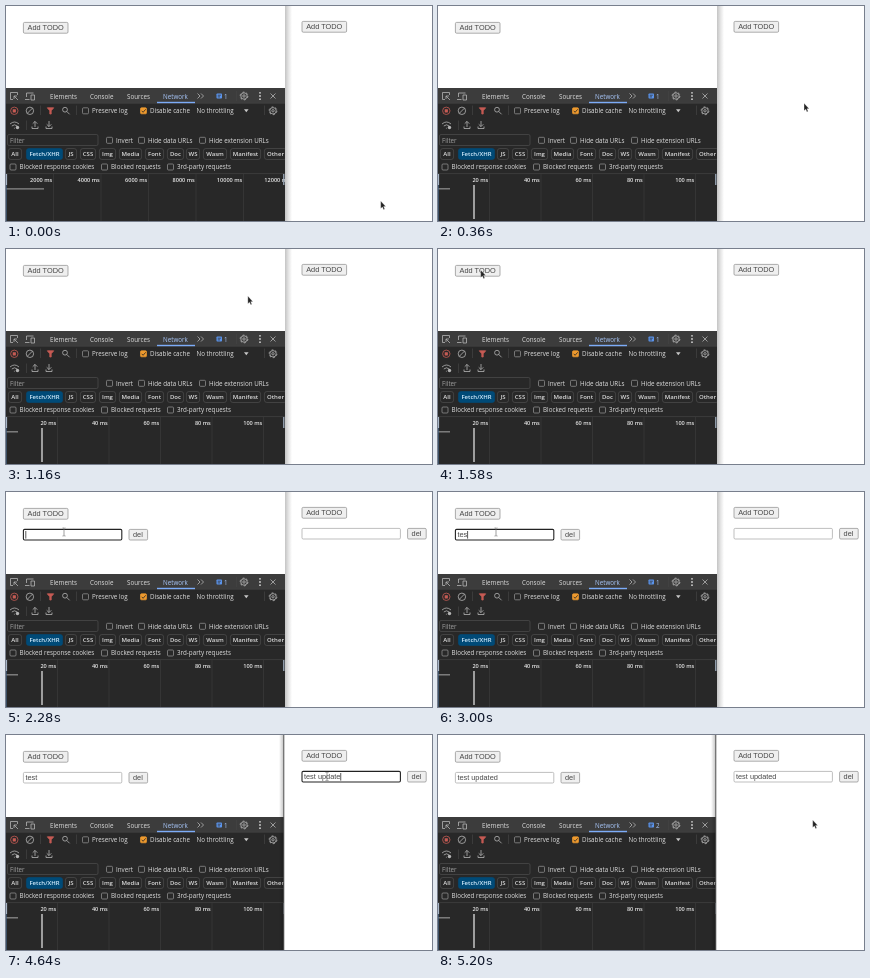
These frames come from a looping animation (426x215 px, 5.22 s). An HTML page:

```html
<!DOCTYPE html>
<html lang="en">
<head>
<meta charset="utf-8">
<title>Synced TODO list</title>
<style>
html, body { margin: 0; width: 100%; height: 100%; overflow: hidden; background: #fff; }
svg { display: block; width: 426px; height: 215px; }
text { white-space: pre; }
.page text { font: 7.35px "Liberation Sans", Arial, sans-serif; fill: #484848; }
.tools text { font: 6.25px "Open Sans", "Noto Sans", sans-serif; fill: #dedede; }
.tools text.strong { font-weight: 600; font-size: 6px; }
.tools .scale text { font-size: 5.6px; font-weight: 600; fill: #e8e8e8; }
.button { fill: #efefef; stroke: #8c8c8c; stroke-width: .7; }
.field { fill: #fff; stroke: #a4a4a4; stroke-width: .7; }
.field.focus { stroke: #222; stroke-width: 1.1; }
.icon { fill: none; stroke: #b4b4b4; stroke-width: .8; }
.icon.red { stroke: #c65b54; }
.rule { stroke: #444; stroke-width: .7; }
.scale .rule { stroke: #3c3c3c; }
.chip { fill: none; stroke: #545454; stroke-width: .6; }
.chip.on { fill: #004a77; stroke: #004a77; }
.box { fill: #282828; stroke: #9a9a9a; stroke-width: .7; }
.box.on { fill: #ee9a2e; stroke: #ee9a2e; }
</style>
</head>
<body>
<svg viewBox="0 0 426 215">
  <defs>
    <linearGradient id="toRight"><stop stop-color="#c4c4c4"/><stop offset=".5" stop-color="#e4e4e4"/><stop offset="1" stop-color="#fff"/></linearGradient>
    <linearGradient id="toLeft"><stop stop-color="#000" stop-opacity="0"/><stop offset="1" stop-color="#000" stop-opacity=".25"/></linearGradient>
    <clipPath id="leftEdge"><rect width="279" height="215"/></clipPath>
  </defs>
  <rect width="426" height="215" fill="#fff"/>
  <g class="tools" id="tools" clip-path="url(#leftEdge)"></g>
  <g class="page" id="page"></g>
  <rect id="leftActive" x="279" width="7" height="215" fill="url(#toRight)"/>
  <g id="rightActive">
    <rect x="278" width="2" height="215" fill="#fff"/>
    <rect x="273" width="5" height="215" fill="url(#toLeft)"/>
    <path d="M277.8 0V215" stroke="#555"/>
  </g>
  <path id="arrow" d="M-.3 0V7.6L1.4 6.1L2.6 8.7L3.8 8.1L2.6 5.6H4.8Z" fill="#222" stroke="#fff" stroke-width=".3"/>
  <path id="beam" d="M-1.5 -4H-.4L0 -3.6L.4 -4H1.5M0 -3.6V3.6M-1.5 4H-.4L0 3.6L.4 4H1.5" fill="none" stroke="#777" stroke-width=".7"/>
</svg>
<script>
const LOOP = 5220;
const $ = id => document.getElementById(id);

function add(parent, tag, attrs, content = "") {
  const el = document.createElementNS("http://www.w3.org/2000/svg", tag);
  for (const key in attrs) el.setAttribute(key, attrs[key]);
  el.textContent = content;
  return parent.appendChild(el);
}
const label = (parent, x, y, content, attrs) => add(parent, "text", { x, y, ...attrs }, content);
const rect = (parent, cls, x, y, width, height, rx = 1) =>
  add(parent, "rect", { class: cls, x, y, width, height, rx });
const show = (el, on) => el.style.display = on ? "" : "none";

// Developer tools
const tools = $("tools");
const icon = (d, cls = "") => add(tools, "path", { class: "icon " + cls, d });
const rule = d => add(tools, "path", { class: "rule", d });

function gear(x, y) {
  add(tools, "circle", { class: "icon", cx: x, cy: y, r: 3.9, "stroke-dasharray": "2 2.08" });
  add(tools, "circle", { class: "icon", cx: x, cy: y, r: 3.2 });
  add(tools, "circle", { class: "icon", cx: x, cy: y, r: 1.2 });
}
function check(x, y, content, on) {
  rect(tools, on ? "box on" : "box", x + .5, y - 3, 6, 6);
  if (on) icon(`M${x + 1.7} ${y}l1.4 1.5l2.6 -3`).style.stroke = "#222";
  label(tools, x + 10, y + 2.4, content);
}

add(tools, "rect", { y: 82, width: 279, height: 133, fill: "#282828" });
add(tools, "rect", { y: 82, width: 279, height: 15, fill: "#3c3c3c" });
rule("M0 97.3H279M0 167.6H279M34.5 99.5V109M70.5 99.5V109M20.5 114.5V124M230.5 85V95M258.5 99.5V109");

// Tab bar
icon("M7 93.5H4.5V86.5H11.5V89M8 90L12 94M8 93V90H11");
icon("M20.5 91V87H27.5M19 93.5H23.5M25 89H28.5V94H25Z");
[[44, "Elements"], [84, "Console"], [121, "Sources"]].forEach(([x, name]) => label(tools, x, 92.7, name));
label(tools, 157, 92.7, "Network", { style: "fill:#a8c7fa" });
add(tools, "rect", { x: 151, y: 95.8, width: 38, height: 1.4, fill: "#7cacf8" });
icon("M191.5 87.5L194 90L191.5 92.5M195 87.5L197.5 90L195 92.5");
rect(tools, "", 210.5, 87.5, 5.5, 5, .8).setAttribute("fill", "#5b94ec");
icon("M211.7 89.2H214.8M211.7 90.9H214").style.stroke = "#333";
const issues = label(tools, 218, 92.5, "1", { style: "fill:#a8c7fa" });
gear(238, 90);
for (const y of [86.8, 90, 93.2]) add(tools, "circle", { cx: 254, cy: y, r: .9, fill: "#d0d0d0" });
icon("M264.5 87.5L269.5 92.5M269.5 87.5L264.5 92.5");

// Toolbar
add(tools, "circle", { class: "icon red", cx: 8.3, cy: 104.8, r: 3.7 });
rect(tools, "", 6.7, 103.2, 3.2, 3.2, .3).setAttribute("fill", "#c65b54");
icon("M20.2 104.8a3.7 3.7 0 1 0 7.4 0a3.7 3.7 0 1 0 -7.4 0M21.3 107.3L26.4 102.2");
icon("M41.3 101.8H47.7L45.2 104.8V108H43.8V104.8Z", "red").style.fill = "#c65b54";
icon("M56.6 103.7a2.4 2.4 0 1 0 4.8 0a2.4 2.4 0 1 0 -4.8 0M60.8 105.5L63.6 108.3");
check(76, 104.8, "Preserve log");
check(134, 104.8, "Disable cache", true);
label(tools, 190.5, 107.2, "No throttling");
add(tools, "path", { d: "M238 103.3H242.6L240.3 106.3Z", fill: "#c7c7c7" });
gear(267, 104.8);
icon("M4 118q4.5 -4 9 0M5.8 120q2.7 -2.4 5.4 0M8.4 121.8V122.6");
add(tools, "circle", { cx: 11.5, cy: 121.5, r: 1.7, fill: "#b4b4b4" });
icon("M29 121V115.5M26.7 117.7L29 115.4L31.3 117.7M26 120.5V122.5H32V120.5");
icon("M43 115V120.5M40.7 118.3L43 120.6L45.3 118.3M40 120.5V122.5H46V120.5");

// Filters
rect(tools, "chip", 1.5, 128.5, 90.5, 11, 1.5);
label(tools, 4, 136.6, "Filter", { style: "fill:#a0a0a0" });
check(100, 134.3, "Invert");
check(132, 134.3, "Hide data URLs");
check(193, 134.3, "Hide extension URLs");
const chips = [["All", 2, 16], ["Fetch/XHR", 20, 57], ["JS", 59, 71], ["CSS", 74, 90], ["Img", 93, 110],
  ["Media", 113, 136], ["Font", 139, 158], ["Doc", 161, 178], ["WS", 180, 194], ["Wasm", 197, 221],
  ["Manifest", 224, 255], ["Other", 258, 281]];
for (const [name, left, right] of chips) {
  const on = name === "Fetch/XHR";
  rect(tools, on ? "chip on" : "chip", left + .4, 142.5, right - left - .8, 11, 2.5);
  label(tools, (left + right) / 2, 150.4, name,
    { class: "strong", "text-anchor": "middle", style: on ? "fill:#d6efff" : "" });
}
check(3.5, 161, "Blocked response cookies");
check(95, 161, "Blocked requests");
check(161, 161, "3rd-party requests");

// Timeline overview
function overview(step, unit, count, bar) {
  const g = add(tools, "g", { class: "scale" });
  for (let i = 1; i <= count; i++) {
    add(g, "path", { class: "rule", d: `M${i * step} 168V215` });
    label(g, i * step - 1.2, 175.8, `${i * unit} ms`, { "text-anchor": "end" });
  }
  add(g, "path", { d: `M0 182.8H${bar}`, stroke: "#8b8b8b", "stroke-width": 1.3 });
  return g;
}
const longScale = overview(47.5, 2000, 6, 38);
const shortScale = overview(51.5, 20, 5, 12);
add(shortScale, "path", { d: "M36 179V213", stroke: "#ddd", "stroke-width": 1.3 });
add(tools, "path", { d: "M.5 168V179M277.8 168V179", stroke: "#a9b7c9", "stroke-width": 1.2 });
add(tools, "path", { d: "M.4 179V215", stroke: "#44617f", "stroke-width": .8 });

// Pages
function todoPage(x, y) {
  const page = $("page");
  rect(page, "button", x + .4, y + .4, 44.6, 10.8, 1.2);
  label(page, x + 4.6, y + 8.4, "Add TODO");
  const row = add(page, "g", {});
  const field = rect(row, "field", x + .4, y + 21.4, 98.4, 10.6, 1.2);
  const text = label(row, x + 2.4, y + 29.2, "");
  const caret = add(row, "path", { stroke: "#111", "stroke-width": .7 });
  rect(row, "button", x + 106, y + 21.4, 18.6, 10.6, 1.2);
  label(row, x + 110, y + 29.2, "del");
  return {
    inField: (px, py) => px > x && px < x + 99 && py > y + 21 && py < y + 32.5,
    draw(visible, value, focused, caretOn) {
      show(row, visible);
      text.textContent = value;
      field.setAttribute("class", focused ? "field focus" : "field");
      show(caret, focused && caretOn);
      const cx = x + 2.8 + (visible && value ? text.getComputedTextLength() : 0);
      caret.setAttribute("d", `M${cx} ${y + 23}V${y + 30.6}`);
    }
  };
}
const left = todoPage(17, 16);
const right = todoPage(295.6, 15);

// Timing in ms
const ADDED = 1720, LEFT_BLUR = 3460, RIGHT_FOCUS = 4180, RIGHT_BLUR = 4960, SYNCED = 5020;
const leftKeys = [2560, 2720, 2860, 3020];
const rightKeys = [4300, 4350, 4400, 4450, 4510, 4560, 4610, 4720];
const pointer = [[0, 375, 195], [80, 375, 194], [480, 364, 71], [800, 364, 71], [1080, 280, 52],
  [1400, 43, 21], [1740, 43, 21], [2060, 58, 40], [3260, 58, 40], [3600, 170, 42],
  [3780, 170, 42], [4120, 321, 41.5], [4900, 321, 41.5], [5180, 375, 85]];

const typed = (word, keys, t) => word.slice(0, keys.filter(k => t >= k).length);

function pointerAt(t) {
  const i = pointer.findIndex(p => p[0] > t);
  if (i < 0) return pointer[pointer.length - 1].slice(1);
  const [t0, x0, y0] = pointer[i - 1], [t1, x1, y1] = pointer[i];
  const u = (t - t0) / (t1 - t0), k = u * u * (3 - 2 * u);
  return [x0 + (x1 - x0) * k, y0 + (y1 - y0) * k];
}

function draw(t) {
  const added = t >= ADDED;
  const first = typed("test", leftKeys, t);
  const second = "test" + typed(" updated", rightKeys, t);
  const rightFront = t >= RIGHT_FOCUS;

  show(longScale, t < 280);
  show(shortScale, t >= 280);
  issues.textContent = t >= SYNCED ? "2" : "1";
  left.draw(added, t >= SYNCED ? second : first, added && t < LEFT_BLUR, (t - ADDED) % 1060 < 600);
  right.draw(added, t >= LEFT_BLUR + 60 ? second : "", rightFront && t < RIGHT_BLUR, true);
  show($("leftActive"), !rightFront);
  show($("rightActive"), rightFront);

  const [x, y] = pointerAt(t);
  const overField = added && (left.inField(x, y) || right.inField(x, y));
  const place = `translate(${x} ${y})`;
  $("arrow").setAttribute("transform", place);
  $("beam").setAttribute("transform", place);
  show($("arrow"), !overField);
  show($("beam"), overField);
}

function tick() {
  draw(performance.now() % LOOP);
  requestAnimationFrame(tick);
}
tick();
</script>
</body>
</html>
```
